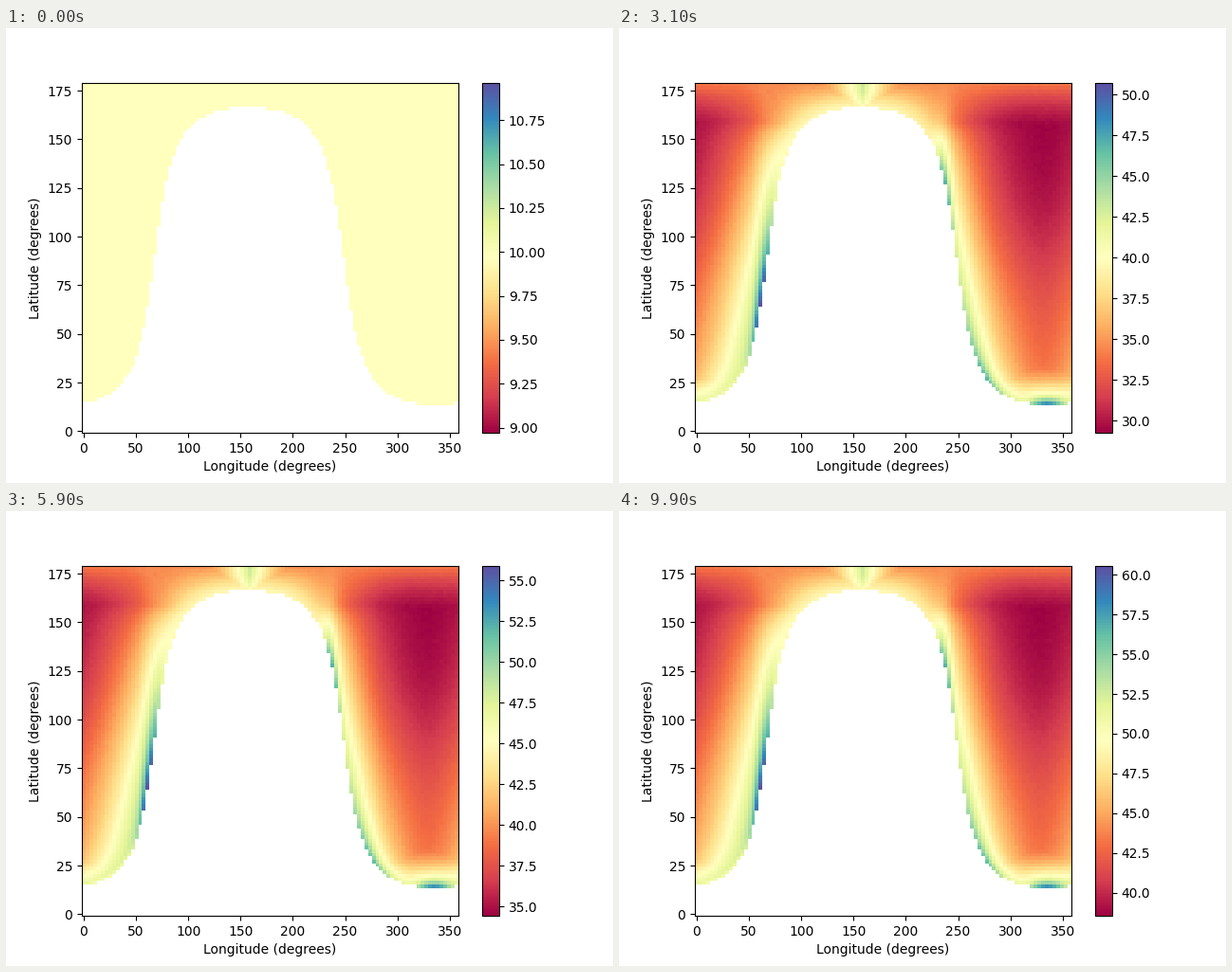
A matplotlib script for the animation above (10 s loop, 640 by 480 pixels).

```python
import numpy as np
import matplotlib.pyplot as plt
from matplotlib.animation import FuncAnimation

START = 9.967        # uniform temperature before heating
TILT = 0.2442        # tangent of the axis tilt
NOON = 338.1         # longitude facing the star
STEPS = 100

# Steps play in text order: 0, 1, 10, 11, ..., 19, 2, 20, ...
ORDER = sorted(range(STEPS), key=str)
PAUSES = (52, 62, 72)    # positions that repeat the picture before them

# Hot stretches of the day-night edge: longitude, width, strength
HOT_EDGES = [(62, 10, 0.42), (238, 8, 0.38), (275, 25, 0.30), (335, 16, 0.40)]

lon = np.arange(100) * 3.6
lat = np.arange(100) * 1.8
LON, LAT = np.meshgrid(lon, lat)
theta = np.radians(LAT)


def wrap(angle):
    return (angle + 180) % 360 - 180


def star_height(offset):
    """Sine of the star's elevation, by degrees of longitude from noon."""
    across = np.sin(theta) * np.cos(np.radians(offset))
    return (across - TILT * np.cos(theta)) / np.hypot(1, TILT)


def elevation(offset):
    return np.degrees(np.arcsin(np.clip(star_height(offset), 0, 1)))


offset = wrap(LON - NOON)
dark = star_height(offset) <= 0

# Half width of the lit side in each row, in degrees of longitude
cot = np.cos(theta) / np.maximum(np.sin(theta), 1e-6)
half_width = np.degrees(np.arccos(np.clip(TILT * cot, -1, 1)))

edge = sum(amount * np.exp(-(wrap(LON - center) / width) ** 2)
           for center, width, amount in HOT_EDGES) - 0.15
edge = edge * np.exp(-elevation(offset) / 4)

east = np.sin(np.radians(offset))
drift = 0.05 * np.sin(2 * theta) + 0.04 * east * abs(east) * np.sin(theta)
grain = np.random.default_rng(4).normal(0, 0.002, LON.shape)


def pattern(step):
    """Heat on the lit side, scaled to 0..1; the cold spot drifts west."""
    shift = 40 * np.exp(-step / 14) - 9
    moved = offset - shift * np.exp(-(offset / 60) ** 2)
    depth = np.minimum(half_width - np.hypot(moved, 10), 3 * elevation(moved))
    heat = 0.63 * np.exp(-np.maximum(depth, 0) / 42) + drift + edge + grain
    heat = np.ma.array(heat, mask=dark)
    return (heat - heat.min()) / (heat.max() - heat.min())


def limits(step):
    """Coldest and hottest temperature at a step."""
    if step == 0:
        return 0.9 * START, 1.1 * START
    u = np.log((step + 8) / 16)
    high = 37.3 + 13.9 * u - 0.87 * u ** 2
    span = 21.45 + 0.6 * (step / 50 - 1) ** 2
    span *= 1 - 0.25 * np.exp(-step / 2)
    return high - span, high


def temperature(step):
    if step == 0:
        return np.ma.array(np.full(LON.shape, START), mask=dark)
    low, high = limits(step)
    return low + (high - low) * pattern(step)


fig, ax = plt.subplots(figsize=(6.4, 4.8), dpi=100)
low, high = limits(0)
mesh = ax.pcolormesh(lon, lat, temperature(0), cmap="Spectral",
                     vmin=low, vmax=high, shading="nearest")
fig.colorbar(mesh, ax=ax)
ax.set_yticks(np.arange(0, 180, 25))
ax.set_xlabel("Longitude (degrees)")
ax.set_ylabel("Latitude (degrees)")


def update(i):
    step = ORDER[i - 1] if i in PAUSES else ORDER[i]
    mesh.set_array(temperature(step))
    mesh.set_clim(*limits(step))
    return [mesh]


anim = FuncAnimation(fig, update, frames=STEPS, interval=100,
                     repeat=True, repeat_delay=0, blit=False)
plt.show()
```
